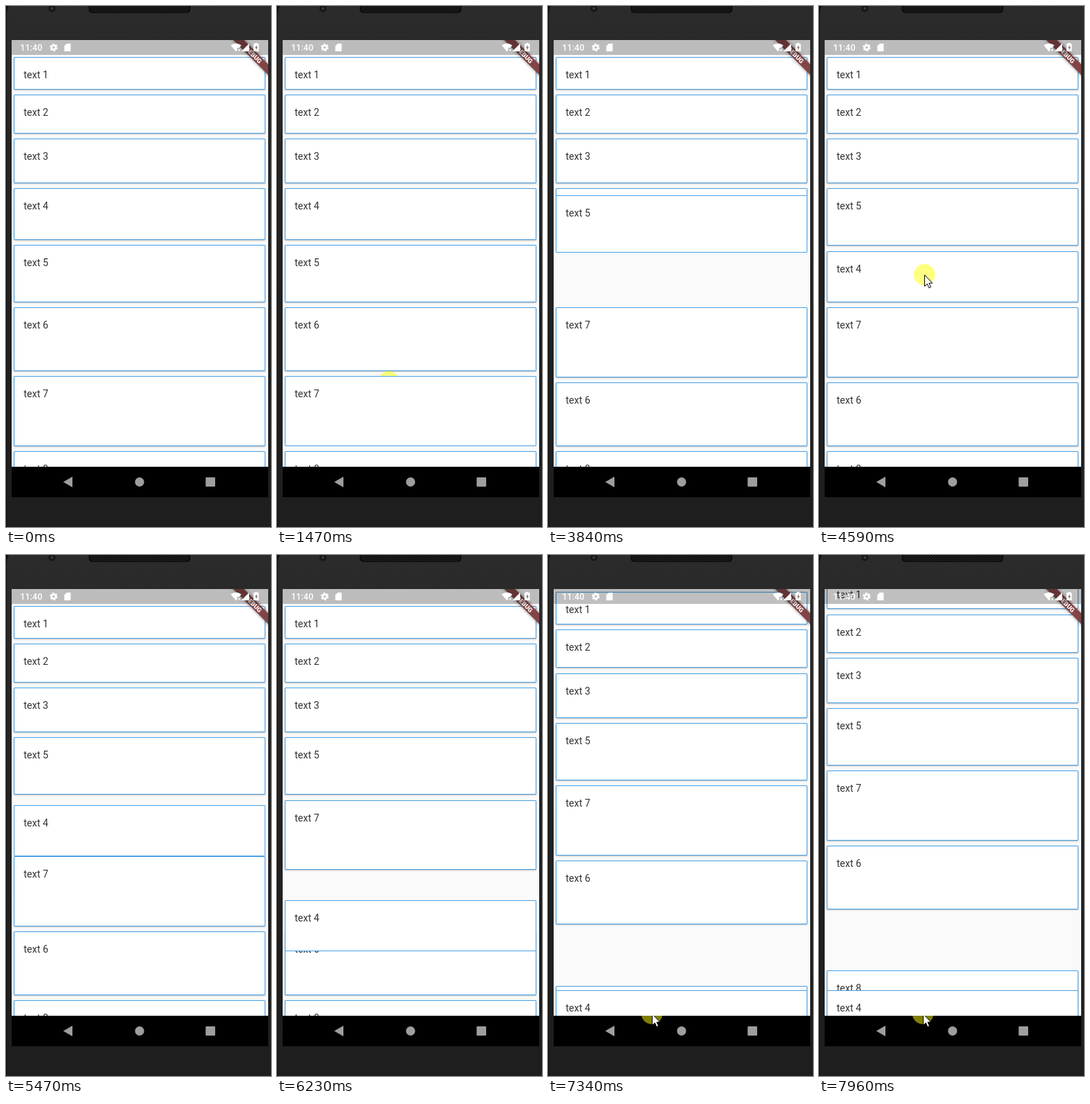
Animation of 375x735 px, one loop 8 s. Source, as an HTML page:

```html
<!DOCTYPE html>
<html lang="en">
<head>
<meta charset="utf-8">
<title>Reorderable list</title>
<style>
html, body { margin: 0; width: 100%; height: 100%; overflow: hidden; background: #222; }
#stage { position: relative; width: 375px; height: 735px; overflow: hidden; }
svg { position: absolute; left: 0; top: 0; }
#list { position: absolute; left: 8px; top: 48px; width: 363px; height: 602px; overflow: hidden; background: #fafafa; }
.card {
  position: absolute; left: 3px; top: -48px; width: 356px; box-sizing: border-box;
  padding: 14px 13px; border: 1px solid #4ba2e6; border-radius: 1px; background: #fff;
  box-shadow: 0 1px 2px rgba(0, 0, 0, .26);
  font: 14px/20px Roboto, sans-serif; color: #333; white-space: pre;
}
.card.held { box-shadow: none; z-index: 1; }
text { font-family: Roboto, sans-serif; fill: #fff; }
</style>
</head>
<body>
<div id="stage">
  <svg width="375" height="735">
    <defs>
      <linearGradient id="body" x2="0" y2="1">
        <stop offset="0" stop-color="#2b2b2b"/>
        <stop offset=".5" stop-color="#222"/>
        <stop offset="1" stop-color="#1e1e1e"/>
      </linearGradient>
      <pattern id="mesh" width="4" height="4" patternUnits="userSpaceOnUse">
        <circle cx="1" cy="1" r=".8" fill="#333"/>
        <circle cx="3" cy="3" r=".8" fill="#333"/>
      </pattern>
    </defs>
    <rect width="375" height="735" fill="url(#body)"/>
    <path d="M0 0H4Q1 4 1 14V735H0Z" fill="#0c0c0c"/>
    <rect x="117" y="-6" width="144" height="16" rx="5" fill="#0d0d0d"/>
    <rect x="119" y="-6" width="140" height="15" rx="5" fill="url(#mesh)"/>
    <circle cx="65" cy="3.5" r="5" fill="#161616"/>
    <circle cx="65" cy="3.5" r="2" fill="#383c40"/>
  </svg>
  <div id="list"></div>
  <svg width="375" height="735">
    <defs>
      <clipPath id="screen"><rect x="8" y="48" width="363" height="602"/></clipPath>
      <filter id="soft" x="-20%" y="-100%" width="140%" height="300%"><feGaussianBlur stdDeviation="2"/></filter>
    </defs>
    <g clip-path="url(#screen)">
      <g transform="translate(371.5 48) rotate(45)">
        <rect x="-40" y="24.6" width="80" height="10.6" opacity=".5" filter="url(#soft)"/>
        <rect x="-40" y="24.6" width="80" height="10.6" fill="#834446"/>
        <text y="33.2" font-size="9" font-weight="900" text-anchor="middle">DEBUG</text>
      </g>
      <rect x="8" y="48" width="363" height="21" opacity=".25"/>
    </g>
    <g fill="#fff">
      <text x="20" y="63" font-size="12.4" font-weight="500">11:40</text>
      <circle cx="67.5" cy="58.5" r="3" fill="none" stroke="#fff" stroke-width="2.6"/>
      <circle cx="67.5" cy="58.5" r="4.7" fill="none" stroke="#fff" stroke-width="1.8" stroke-dasharray="2.7 2.22"/>
      <path d="M86 53h5.500v11h-9v-7.500z"/>
      <path d="M318 55.500Q325.500 50 333 55.500L330 59h-3v3.600l-1.500 1.700z"/>
      <path d="M328.500 60.500l3 3m0-3l-3 3" stroke="#fff"/>
      <path d="M344 53v11h-11z"/>
      <path d="M352.500 52h3v1.200h2.200V64h-7.400V53.200h2.200z"/>
      <path d="M354.800 55l-2.500 4.300h1.500v3l2.400-4.300h-1.400z" fill="#8b7474"/>
    </g>
    <rect x="8" y="650" width="363" height="43"/>
    <g fill="#9e9e9e">
      <path d="M81 671.500L94 664v15z"/>
      <circle cx="189" cy="671.500" r="6.500"/>
      <rect x="282.500" y="665" width="13.500" height="13" rx="1"/>
    </g>
    <g id="pointer">
      <circle id="press" r="15" fill="#ff0" opacity=".5"/>
      <path d="M.5 .5V16.500L4.200 13L6.700 18.700L9.300 17.500L6.800 12H11.500Z" fill="#fff" stroke="#000"/>
    </g>
  </svg>
</div>
<script>
// The picture advances in ticks; all times below are tick numbers.
const LOOP = 8000, TICK = 124.6;
const DP = 363 / 411.4;   // pixels per layout unit
const FIRST = 72.5;       // top of the first card
const LAG = 0.5;          // a held card trails the pointer
const SLIDE = 2;          // length of a swap
const $ = id => document.getElementById(id);

const drags = [
  { n: 7, press: 7, lift: 12, drop: 19 },
  { n: 5, press: 23, lift: 27, drop: 34 },
  { n: 4, press: 37, lift: 42, drop: Infinity }
];
// Neighbours changing places
const swaps = [
  { at: 14, a: 6, b: 7 }, { at: 31, a: 4, b: 5 },
  { at: 44, a: 4, b: 7 }, { at: 50, a: 4, b: 6 }
];
// Pointer stops: [tick, x, y]
const stops = [
  [1, 239, 610], [7, 158, 530], [13, 158, 530], [18, 175, 395], [19, 175, 410],
  [20, 175, 410], [23, 167, 383], [28, 167, 383], [31, 171, 308], [33, 171, 304],
  [37, 149, 379], [43, 149, 379], [46, 148, 475], [50, 147, 522], [57, 147, 647]
];

const clamp = u => Math.min(1, Math.max(0, u));
const lerp = (a, b, u) => a + (b - a) * u;

function pointer(k) {
  const i = Math.max(1, stops.findLastIndex(s => s[0] <= k) + 1);
  const [t0, x0, y0] = stops[i - 1], [t1, x1, y1] = stops[i] || [Infinity, x0, y0];
  const u = clamp((k - t0) / (t1 - t0)), s = u * u * (3 - 2 * u);
  return { x: lerp(x0, x1, s), y: lerp(y0, y1, s) };
}

// Each card is 10 units taller than the one before, with 8 units between.
const height = n => (42 + 10 * n) * DP;
function layout(order) {
  const tops = {};
  let y = FIRST;
  for (const n of order) {
    tops[n] = y;
    y += height(n) + 8 * DP;
  }
  return tops;
}

function homes(k) {
  let order = [1, 2, 3, 4, 5, 6, 7, 8];
  let tops = layout(order);
  for (const { at, a, b } of swaps) {
    if (k <= at) break;
    order = order.map(n => n === a ? b : n === b ? a : n);
    const next = layout(order), u = clamp((k - at) / SLIDE);
    for (const n of order) tops[n] = lerp(tops[n], next[n], u);
  }
  return tops;
}

for (const d of drags) d.grip = pointer(d.press).y - homes(d.press)[d.n];

const cards = [1, 2, 3, 8, 6, 7, 4, 5].map(n => {
  const el = document.createElement('div');
  el.className = 'card';
  el.textContent = 'text ' + n;
  $('list').append(el);
  return { n, el };
});

function draw(now) {
  const k = Math.floor((now % LOOP + 30) / TICK);
  const scroll = Math.max(0, (k - 54.24) * 4.24);
  const tops = homes(k);
  const drag = drags.find(d => k >= d.press && k < d.drop);
  for (const { n, el } of cards) {
    const held = !!drag && drag.n === n && k >= drag.lift;
    const y = held ? pointer(k - LAG).y - drag.grip : tops[n] - scroll;
    const top = Math.floor(y);
    el.style.transform = `translateY(${top}px)`;
    el.style.height = Math.floor(y + height(n)) - top + 'px';
    el.classList.toggle('held', held);
  }
  const { x, y } = pointer(k);
  $('pointer').setAttribute('transform', `translate(${Math.round(x)} ${Math.round(y)})`);
  $('pointer').style.display = k < 1 ? 'none' : '';
  $('press').style.display = drag ? '' : 'none';
}

const start = performance.now();
function loop() {
  draw(performance.now() - start);
  requestAnimationFrame(loop);
}
loop();
</script>
</body>
</html>
```
